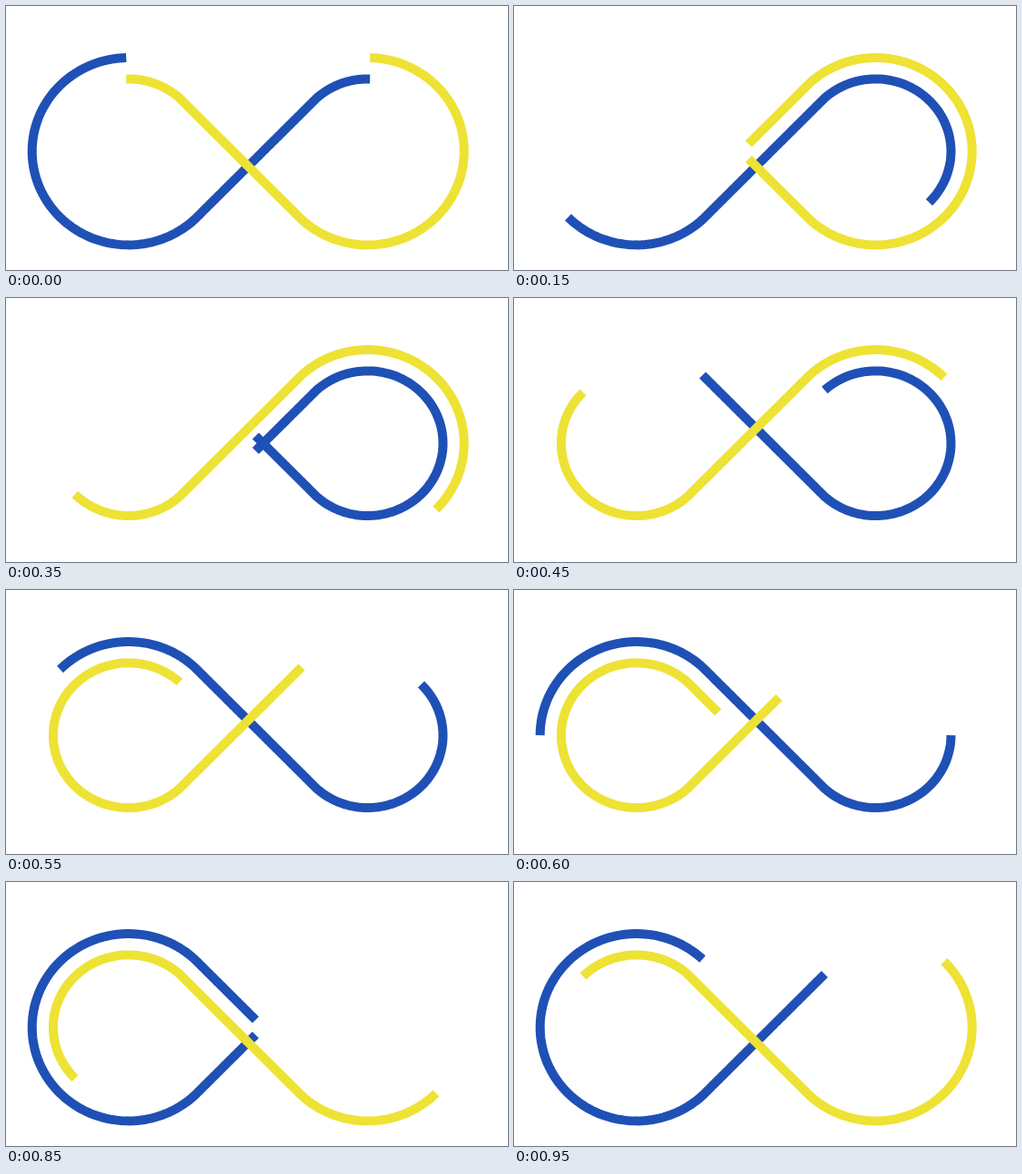
Recreate the animation shown at these times as an HTML page with a canvas. Size 552 by 291 pixels, loop 1000 ms.

```html
<!DOCTYPE html>
<html lang="en">
<head>
<meta charset="utf-8">
<title>Infinity loader</title>
<style>
html, body { margin: 0; height: 100%; overflow: hidden; background: #fff; }
canvas { display: block; }
</style>
</head>
<body>
<canvas id="stage" width="552" height="291"></canvas>
<script>
const ctx = document.getElementById("stage").getContext("2d");
const CX = 266.2, CY = 160.2, HALF = 131.5;   // stage centre, distance to each lobe
const STEPS = 20, STEP_MS = 50;

// A lobe is an elliptic arc, s = 0..6, 45 degrees per step, symmetric about its far side.
// The angles are seen from a pivot 2.5 px outside the ellipse centre.
function lobe(side, a, b, s) {
  const seen = (s - 3) * Math.PI / 4;
  const polar = seen - 2.5 / b * Math.sin(seen);
  const t = Math.atan2(a * Math.sin(polar), b * Math.cos(polar));
  return [side * (HALF + a * Math.cos(t)), b * Math.sin(t)];
}
const outer = s => lobe(-1, 106, 103.2, s);
const inner = s => lobe(1, 82.8, 79.8, s);
const mix = (p, q, k) => p.map((v, i) => v + (q[i] - v) * k);

// Position on the closed figure eight: lobe 6 steps, diagonal 4, lobe 6, diagonal 4.
function point(u) {
  u %= STEPS;
  if (u <= 6) return outer(u);
  if (u < 10) return mix(outer(6), inner(0), (u - 6) / 4);
  if (u <= 16) return inner(u - 10);
  return mix(inner(6), outer(0), (u - 16) / 4);
}

// Each ribbon covers half of the loop.
function ribbon(color, tail, angle) {
  ctx.save();
  ctx.translate(CX, CY);
  ctx.rotate(angle);
  ctx.beginPath();
  for (let i = 0; i <= 200; i++) ctx.lineTo(...point(tail + i / 20));
  ctx.strokeStyle = color;
  ctx.lineWidth = 10;
  ctx.stroke();
  ctx.restore();
}

function draw(now) {
  const step = Math.floor(now / STEP_MS) % STEPS;
  ctx.fillStyle = "#fff";
  ctx.fillRect(0, 0, 552, 291);
  ribbon("#1f50b5", step + 1, 0);
  ribbon("#eee234", step + 15, Math.PI);
}

let begin;
function tick(now) {
  begin ??= now;
  draw(now - begin);
  requestAnimationFrame(tick);
}
draw(0);
requestAnimationFrame(tick);
</script>
</body>
</html>
```
